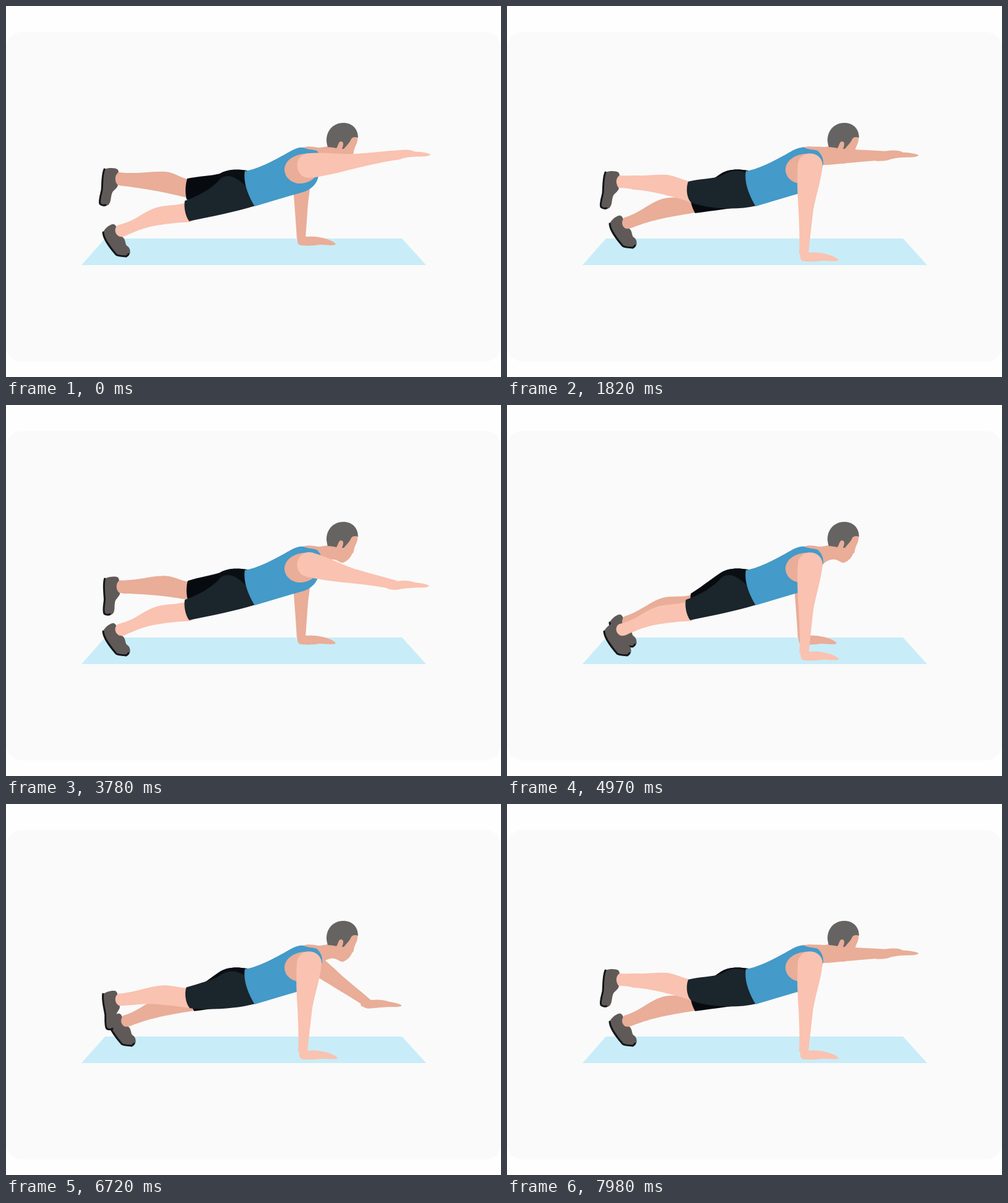
Write an HTML page that moves like this. It is 800 px wide and 600 px high and loops after 8000 ms.

```html
<!DOCTYPE html>
<html lang="en">
<head>
<meta charset="utf-8">
<title>Plank reach</title>
<style>
  html, body { margin: 0; width: 100%; height: 100%; overflow: hidden; background: #fefefe; }
  svg { display: block; width: 100vw; height: 100vh; }
</style>
</head>
<body>
<svg viewBox="0 0 800 600">
  <rect width="800" height="600" fill="#fefefe"/>
  <rect y="42" width="800" height="533" rx="26" fill="#fafafa"/>
  <path d="M160 376H640L679 419H122Z" fill="#c8edf8"/>

  <g fill="#e9ad98">
    <path id="farArm" d="M0 -16C25 -17 45 -15 62 -13C80 -10 115 -9 135 -7L135 7C115 8 90 10 62 12C45 14 20 14 0 14Z"/>
    <path id="farHand"/>
  </g>
  <g id="farShoe"><path class="upper" fill="#5f5a58"/><path class="sole" fill="none" stroke="#14161a" stroke-width="3" stroke-linecap="round"/></g>
  <path id="farLeg" fill="#e9ad98"/>
  <path id="farShorts" fill="#070b10"/>

  <path fill="#e9ad98" d="M474 234C482 225 492 227 504 229C510 229 515 228 520 227L545 205L568 211C570 221 563 227 562 236C562 239 560 240 559 241C557 247 552 252 545 255C540 256 537 251 530 250C521 249 514 254 508 260L480 262Z"/>
  <path fill="#666462" d="M520 228C513 207 526 189 545 189C560 189 569 199 569 213C564 211 560 212 558 215C556 220 552 224 546 231L543 231C546 224 546 219 541 219C537 220 537 226 534 230C530 229 524 228 520 228Z"/>

  <g id="nearShoe"><path class="upper" fill="#5f5a58"/><path class="sole" fill="none" stroke="#14161a" stroke-width="3" stroke-linecap="round"/></g>
  <path id="nearLeg" fill="#fac2b0"/>
  <path fill="#0a0f14" d="M343 273C355 264 372 263 390 266L404 322L350 327Z"/>
  <path id="nearShorts" fill="#1a252c"/>

  <path fill="#449ac8" d="M386 267C405 264 425 254 445 243C460 235 470 227 481 229C486 232 495 232 502 234C508 239 512 247 511 256L505 274C504 286 494 297 480 301C455 308 425 317 402 324C391 306 383 285 386 267Z"/>
  <path fill="#e9ad98" d="M492 239C470 237 450 248 450 265C451 280 465 288 477 287C492 286 503 277 505 264Z"/>

  <g fill="#fac2b0">
    <path id="nearArm" d="M0 -20C25 -19 45 -13 72 -10C90 -9 120 -8 144 -7L144 8C125 8 95 11 72 14C50 17 25 20 0 20C-26 20 -26 -20 0 -20Z"/>
    <path id="nearHand"/>
  </g>
</svg>
<script>
const LOOP = 8000, STEP = 70;
const RISE = 620, HOLD = 464, FALL = 560;

// Start time of each lift and which arm reaches; the opposite leg follows.
const LIFTS = [[-720, "near"], [1190, "far"], [3343, "near"], [5390, "far"], [7340, "far"]];

// Each shape: pose on the mat, pose fully lifted.
const SHAPES = {
  nearLeg: [
    "M300 316C280 322 268 322 258 323C238 325 225 334 210 343C200 349 188 352 180 355C174 360 176 370 184 373C192 374 195 370 204 367C225 357 250 352 300 349Z",
    "M300 284C285 283 272 274 258 273C240 272 225 275 210 274C200 274 190 275 182 274C175 278 175 290 182 294C190 295 196 294 204 297C225 298 255 304 300 318Z"],
  farLeg: [
    "M305 306C285 311 275 309 262 310C245 311 232 321 218 329C208 335 198 340 190 342C184 347 185 357 192 360C200 361 204 357 212 355C235 346 262 341 305 334Z",
    "M300 281C285 280 272 269 258 268C240 267 225 270 210 270C200 270 190 270 182 269C175 273 175 286 182 290C190 292 196 291 204 293C225 296 255 300 300 312Z"],
  nearShorts: [
    "M289 315C315 306 336 292 346 280C356 270 372 275 388 292L403 323C370 333 330 341 296 348C290 340 287 325 289 315Z",
    "M293 284C310 279 333 280 348 274C360 266 374 264 388 270L403 323C370 331 325 328 298 318C290 311 289 293 293 284Z"],
  farShorts: [
    "M297 305C318 292 334 278 346 271C356 264 372 263 388 266L400 322C370 326 335 331 304 335C299 326 295 314 297 305Z",
    "M293 279C312 275 330 275 346 271C356 265 372 264 388 266L400 322C370 326 325 316 292 313C289 302 290 288 293 279Z"],
  hand: [
    "M-6 -4L12 -3C24 -4 34 -1 42 1C50 4 58 8 55 10C50 12 38 10 30 10C20 12 8 12 -1 11C-7 10 -6 2 -6 -4Z",
    "M-16 -6L0 -7C14 -9 22 -8 28 -5C38 -5 54 -2 53 0C50 3 40 3 34 3C24 3 16 4 8 6C2 9 -8 9 -16 9Z"],
  upper: [
    "M-22 -12C-14 -17 -4 -16 -1 -14C2 -11 1 -6 -2 -2C-4 4 -3 9 0 11C2 18 -1 20 -2 26C0 30 0 34 -2 37C-4 42 -8 42 -12 41C-16 38 -22 34 -24 30C-26 16 -27 -4 -22 -12Z",
    "M-22 -14C-14 -17 -4 -16 -1 -14C2 -11 1 -6 -2 -2C-4 4 -3 9 0 11C-1 18 -9 20 -10 26C-12 32 -11 40 -16 44C-20 46 -27 45 -30 42C-32 38 -28 28 -26 20C-25 8 -26 -4 -22 -14Z"],
  sole: [
    "M-7 40C-8 41 -10 41 -12 41C-16 38 -22 34 -24 30C-26 16 -27 -4 -22 -12",
    "M-20 44C-23 45 -27 44 -29 42C-31 38 -28 28 -26 20C-25 8 -26 -4 -22 -14"]
};

const ARMS = {
  near: { x: 490, y: 258, angle: [94, -7], reach: [144, 144] },
  far: { x: 477, y: 244, angle: [90, -1], reach: [132, 135] }
};
const ANKLES = {
  near: [[182, 364], [181, 283]],
  far: [[191, 350], [181, 278]]
};

const $ = s => document.querySelector(s);
const lerp = (a, b, p) => a + (b - a) * p;
const clamp = v => Math.min(1, Math.max(0, v));
const ease = v => (1 - Math.cos(Math.PI * clamp(v))) / 2;

function morph(name, p) {
  const [from, to] = SHAPES[name];
  const ends = to.match(/-?\d+/g);
  let i = 0;
  return from.replace(/-?\d+/g, n => " " + lerp(+n, +ends[i++], p).toFixed(2));
}

function lift(t, side) {
  let p = 0;
  for (const [start, arm] of LIFTS) {
    if (arm !== side) continue;
    const d = t - start;
    p = Math.max(p, ease(d / RISE) - ease((d - RISE - HOLD) / FALL));
  }
  return p;
}

function drawArm(side, p) {
  const { x, y, angle, reach } = ARMS[side];
  const deg = lerp(...angle, p), len = lerp(...reach, p), rad = deg * Math.PI / 180;
  $(`#${side}Arm`).setAttribute("transform",
    `translate(${x} ${y}) rotate(${deg}) scale(${len / reach[1]} 1)`);
  const hand = $(`#${side}Hand`);
  hand.setAttribute("d", morph("hand", p));
  hand.setAttribute("transform",
    `translate(${x + len * Math.cos(rad)} ${y + len * Math.sin(rad)})`);
}

function drawLeg(side, p) {
  for (const part of ["Leg", "Shorts"]) {
    $(`#${side}${part}`).setAttribute("d", morph(side + part, p));
  }
  const [down, up] = ANKLES[side];
  const shoe = `#${side}Shoe`, flat = clamp(p / 0.3);
  $(shoe).setAttribute("transform",
    `translate(${lerp(down[0], up[0], p)} ${lerp(down[1], up[1], p)}) rotate(${-33 * (1 - p)})`);
  for (const part of ["upper", "sole"]) {
    $(`${shoe} .${part}`).setAttribute("d", morph(part, flat));
  }
}

function draw(ms) {
  const t = Math.floor((ms % LOOP) / STEP) * STEP;
  const near = lift(t, "near"), far = lift(t, "far");
  drawArm("near", near);
  drawLeg("far", near);
  drawArm("far", far);
  drawLeg("near", far);
}

const begin = performance.now();
function tick() {
  draw(performance.now() - begin);
  requestAnimationFrame(tick);
}
tick();
</script>
</body>
</html>
```
